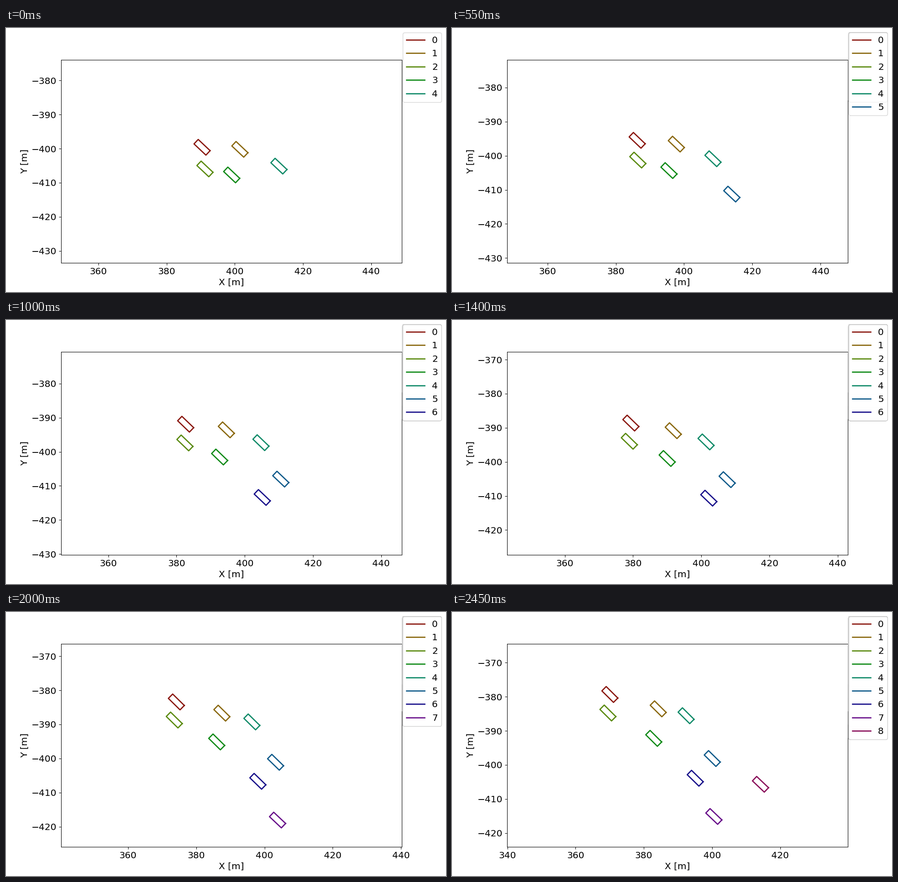
A matplotlib script that plays this animation: 966x580 px, repeating every 2.5 s.

```python
import colorsys

import matplotlib.pyplot as plt
import numpy as np
from matplotlib.animation import FuncAnimation
from matplotlib.patches import FancyBboxPatch
from matplotlib.ticker import MultipleLocator
from matplotlib.transforms import IdentityTransform

DPI = 96.6
STAGE_W, STAGE_H = 966, 580
FRAMES = 50
LAST = FRAMES - 1
FONT = 15
VIEW_W = 100.0
VIEW_H = VIEW_W * (0.77 * STAGE_H) / (0.775 * STAGE_W)
LENGTH, WIDTH = 4.8, 1.8

plt.rcParams.update({"font.family": "DejaVu Sans", "font.size": FONT})

# Per vehicle: entry step, entry point, point at the last step, speed-up
VEHICLES = [
    (0, (390.40, -399.60), (370.04, -379.32), 0.12),
    (0, (401.49, -400.20), (384.22, -383.54), 0.04),
    (0, (391.25, -405.95), (369.47, -384.76), 0.02),
    (0, (399.09, -407.72), (382.91, -392.20), 0.04),
    (0, (412.94, -405.13), (392.40, -385.56), 0.04),
    (11, (414.00, -411.25), (400.07, -398.12), -0.05),
    (13, (407.79, -415.91), (395.08, -403.90), -0.09),
    (38, (404.55, -418.73), (400.54, -415.12), 0.0),
    (42, (416.67, -407.96), (414.22, -405.68), 0.0),
]


def count(step):
    return sum(entry <= step for entry, *_ in VEHICLES)


def place(vehicle, step):
    """Position under nearly uniform motion with a slight change of speed."""
    entry, start, end, gain = vehicle
    t = (step - entry) / (LAST - entry)
    t += gain * t * (t - 1)
    return np.array(start) + t * np.subtract(end, start)


def outline(center, age):
    """Closed rectangle that slowly turns as the vehicle drives on."""
    a = -np.radians(43.3 + 0.03 * age)
    along = np.array([np.cos(a), np.sin(a)]) * LENGTH / 2
    across = np.array([-np.sin(a), np.cos(a)]) * WIDTH / 2
    signs = [(1, 1), (1, -1), (-1, -1), (-1, 1), (1, 1)]
    return np.array([center + p * along + q * across for p, q in signs]).T


fig, ax = plt.subplots(figsize=(STAGE_W / DPI, STAGE_H / DPI), dpi=DPI)
ax.set_xlabel("X [m]")
ax.set_ylabel("Y [m]")
ax.xaxis.set_major_locator(MultipleLocator(20))
ax.yaxis.set_major_locator(MultipleLocator(10))

lines = []
for i in range(len(VEHICLES)):
    color = colorsys.hls_to_rgb(0.01 + i / len(VEHICLES), 0.3, 0.8)
    lines += ax.plot([], [], color=color, lw=2, label=str(i))

sizes = sorted({count(k) for k in range(FRAMES)})
legends = {n: fig.legend(handles=lines[:n], labelspacing=0.516) for n in sizes}


def backing(n):
    """Legend frame left behind by an earlier step."""
    box = legends[n].get_window_extent()
    patch = FancyBboxPatch(
        (box.x0, box.y0), box.width, box.height,
        boxstyle="round,pad=0,rounding_size=0.2", mutation_scale=FONT * DPI / 72,
        fc="white", ec="0.8", lw=1, alpha=0.8, zorder=4,
        transform=IdentityTransform())
    return fig.add_artist(patch)


# Legend frames pile up step by step, so their borders grow heavier.
backings = [backing(count(k)) for k in range(FRAMES)]


def update(step):
    n = count(step)
    centers = np.array([place(v, step) for v in VEHICLES[:n]])
    for i, line in enumerate(lines):
        line.set_visible(i < n)
        if i < n:
            line.set_data(*outline(centers[i], step - VEHICLES[i][0]))
    # The view stays centred on the mean of all vehicles.
    cx, cy = centers.mean(axis=0)
    ax.set_xlim(cx - VIEW_W / 2, cx + VIEW_W / 2)
    ax.set_ylim(cy - VIEW_H / 2, cy + VIEW_H / 2)
    for size, legend in legends.items():
        legend.set_visible(size == n)
    for k, patch in enumerate(backings):
        patch.set_visible(k < step)
    return lines


anim = FuncAnimation(fig, update, frames=FRAMES, interval=50, repeat=True, repeat_delay=0)
plt.show()
```
